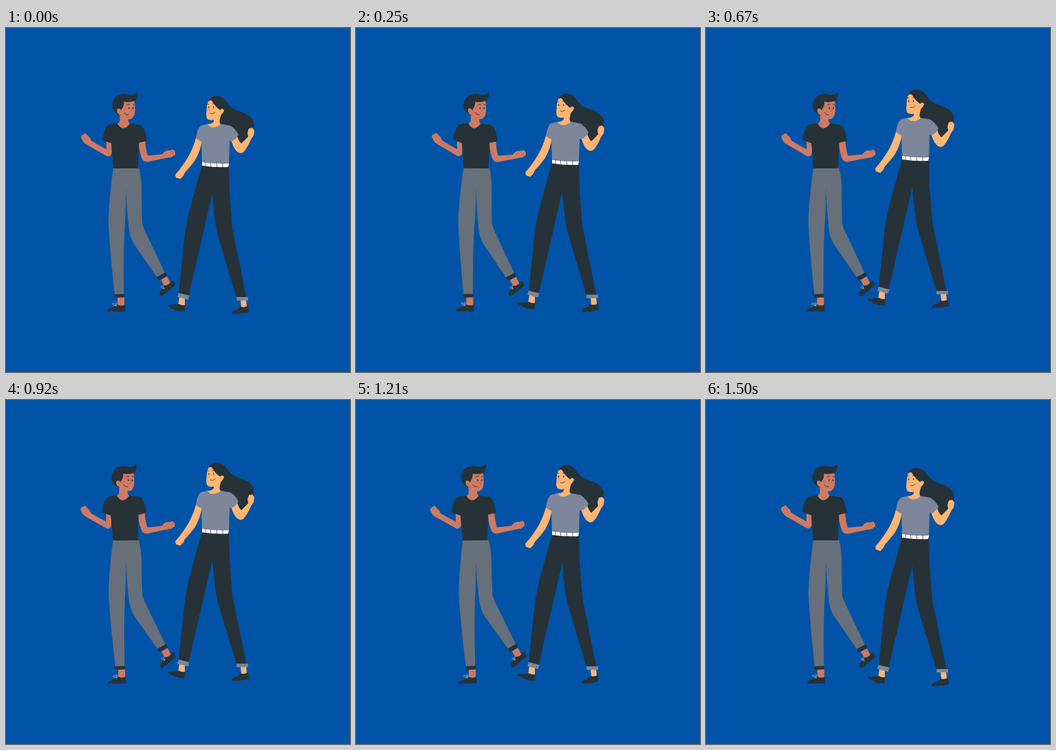
Write an HTML page with a canvas that moves like this. It is 500x500 px and loops after 1.54 s.

```html
<!DOCTYPE html>
<html lang="en">
<head>
<meta charset="utf-8">
<title>Dancing couple</title>
<style>
  html, body { margin: 0; width: 100%; height: 100%; overflow: hidden; background: #0053a6; }
  canvas { display: block; width: 100vw; height: 100vh; }
</style>
</head>
<body>
<canvas id="stage"></canvas>
<script>
const SIZE = 500;
const LOOP = 1540;
const CYCLE = 1500;
const STEP = CYCLE / 36;

const BLUE = '#0053a6';
const DARK = '#263238';
const GREY = '#676f7a';
const SLATE = '#7d869b';
const WHITE = '#ffffff';
const TAN = '#ce7a63';
const PEACH = '#ffb573';
const BLUSH = '#b3594a';
const LACE = '#8494a8';

const fill = (color, d) => ({ color, path: new Path2D(d) });
const line = (color, width, d) => ({ color, width, path: new Path2D(d) });

const man = [
  // arms
  fill(TAN, 'M146 163L153 165C154 174 154 181 153 184Q151 188 146 186L119 170.5Q114 168 112 165L109 159Q109 156 111 155.5L116 153L118 156L122 159.5L124 164L146 176.5Z'),
  fill(TAN, 'M193 164L202 163C203 172 204 180 206 185.5L227 183.5L230 180Q234 177 238 178L243 176.5L246 180L246 184L241 187.5L230 189.5L206 194.5Q199 195 197 188Q193 178 193 164Z'),
  line(BLUSH, .6, 'M238 180L241 183M241 178.5L243.5 181.5M112 157L114 160'),
  // feet
  fill(TAN, 'M162 391L172 391L172 404L162 404Z'),
  fill(TAN, 'M225 366L234 361L239 371L231 376Z'),
  fill(DARK, 'M147 412Q147 408 152 407Q158 405 162 402Q167 405 173 402L173 412Z'),
  fill(DARK, 'M225 389.5Q222 387 224 383Q228 379 229 374Q237 375 240 368L243 367L246 372Q246 375 242 377L231 386.5Q227 390 225 389.5Z'),
  line(LACE, 1, 'M160 404Q153 402 155 400Q157 399 160 404Q158 399 160 399Q162 400 160 404M230 379Q224 378 226 376Q228 375 230 379Q227 373 230 373.5'),
  // trousers
  fill(GREY, 'M156 203L193 203Q198 218 197 245L198 284Q199 289 202 295L231 356L220 363L186 314Q179 303 178 286Q175 258 174 231Q174.5 262 172.5 290Q170.5 330 171.5 388L158 388Q151 325 149 284Q149 253 156 203Z'),
  fill(DARK, 'M157 387L172 386.5L172 391.5L158 392Z'),
  fill(DARK, 'M219 362L232 355L234 360L222 367Z'),
  // shirt, neck
  fill(DARK, 'M163 138.5L179 138.5L195 141Q202 144 205 164L193 167L192 204L156 204L153 167.5Q146 166 140 162Q143 146 148 141Q154 139 163 138.5Z'),
  fill(TAN, 'M165 121L165.5 134Q165 138 162 139Q170 152.5 180 139Q177 138 177.5 130Z'),
  // head
  fill(TAN, 'M168 105L186 104Q188 112 187.5 120Q187 129 182 132Q175 134 168 129L162 124Z'),
  fill(DARK, 'M167 127Q159 125 156 119Q153 112 156 106Q159 98 167 96.5Q173 95 179 97Q187 98 190.5 93Q193 99 188.5 104Q190 106 187 106Q178 109 171.5 107Q172 114 168 118Z'),
  fill(TAN, 'M168 120Q164 115 161.5 118Q160 123 165 126L170 127Z'),
  fill(DARK, 'M178.8 115.3a.9 1.3 0 1 0 .1 0ZM184.6 115.3a.9 1.3 0 1 0 .1 0Z'),
  line(DARK, .9, 'M176 112Q178 110 180 111M184 111Q185 110 187 112M172 123Q174 127 178 126'),
  line(BLUSH, .8, 'M182 116Q185 121 181 121')
];

const woman = [
  // hair behind
  fill(DARK, 'M305 99C314 98.5 318 103 322 109Q327 117 339 121Q356 126 360 136Q361 142 359 150Q356 160 346 166Q341 170 337 162L326 145L309 141L308 112Z'),
  // left arm
  fill(PEACH, 'M276.5 158L285 162Q283 178 275 192Q267 203 260 210L258 214.5L253.5 219.5L247 217.5L246 213L252 206C266 188 272 175 276.5 158Z'),
  // feet
  fill(PEACH, 'M252 391L260 393L260 404L250 404Z'),
  fill(PEACH, 'M341 395L349 395L350 405L342 407Z'),
  fill(DARK, 'M235 404.5Q234.5 402 239 402Q246 403 251 401Q256 404 261 402.5L259.5 412L250 411.5Q241 408 235 404.5Z'),
  fill(DARK, 'M328 415.5Q328 411 335 410L341 405Q347 407 351.5 403.5L353 413Q342 416.5 328 415.5Z'),
  // trousers
  fill(DARK, 'M285 199L324 201L325 240L329 291L349.5 392L335 392L308 302Q303 283 300 240L265.5 389L251 386L260 299Q263 278 270 253Z'),
  fill(SLATE, 'M251 385L266.5 389L264.5 395L249 391Z'),
  fill(SLATE, 'M335 391L352 391L352 396L335 396Z'),
  // right arm
  fill(PEACH, 'M327 161L336 157Q338 164 342 168L352 158L351 152L353 146L358 145L361 149L360 156L356 162Q351 174 345 180.5Q340 184 335 179Q329 172 327 161Z'),
  // shirt, belt
  fill(SLATE, 'M293 139.5L312 139.5L326 142Q333 146 338 155Q335 161 328 165L325 164L324 198L285 196L284 165Q280 163.5 276 160Q278 146 283 142Z'),
  fill(WHITE, 'M285 195Q305 198 324 197L323 202Q303 203 285 200Z'),
  line(DARK, .7, 'M290 195L290 201M297 196L298 202M306 197L307 203M315 197L315 203'),
  // neck and head
  fill(PEACH, 'M302.5 127L302 136Q300 139 293 140Q300 149 312 140Q310 138 310.5 134L314 120Z'),
  fill(PEACH, 'M295 104Q291.5 111 291.5 121Q290 131 294 133Q304 136 311 128.5L317 120L308 105Z'),
  fill(DARK, 'M293 107.5Q297 99 306 98.5Q317 100 320 113L314 121Q305 116 299 105.5Q296 104.5 293 107.5Z'),
  fill(PEACH, 'M310 122Q312 116 316 118Q318.5 122 311 127Z'),
  fill(DARK, 'M294.4 114a.8 1.2 0 1 0 .1 0ZM301.6 114a.8 1.2 0 1 0 .1 0Z'),
  line(DARK, .8, 'M292 111Q294 109 295 111M300 110Q302 109 304 111M297 124Q301 126 304 122'),
  line('#e78b45', .8, 'M297 115Q293 121 297 121')
];

const canvas = document.getElementById('stage');
const ctx = canvas.getContext('2d');

function drawShapes(shapes) {
  for (const { color, width, path } of shapes) {
    if (width) {
      ctx.strokeStyle = color;
      ctx.lineWidth = width;
      ctx.stroke(path);
    } else {
      ctx.fillStyle = color;
      ctx.fill(path);
    }
  }
}

// Linear wave 0, 1, 0, -1, 0 over one cycle.
function sway(p) {
  if (p < .25) return p * 4;
  return p < .75 ? 2 - p * 4 : p * 4 - 4;
}

function drawMan(p) {
  ctx.save();
  ctx.translate(177.5, 252.5);
  ctx.rotate(sway(p) * Math.PI / 180);
  ctx.translate(-177.5, -252.5);
  drawShapes(man);
  ctx.restore();
}

function drawWoman(p) {
  ctx.save();
  ctx.translate(0, -10 * (1 - Math.abs(1 - 2 * p)));
  drawShapes(woman);
  ctx.restore();
}

function resize() {
  const ratio = window.devicePixelRatio || 1;
  canvas.width = Math.round(innerWidth * ratio);
  canvas.height = Math.round(innerHeight * ratio);
}

function render(now) {
  const step = Math.floor((now % LOOP + 3) / STEP);
  const phase = Math.min(1, step * STEP / CYCLE);
  ctx.setTransform(canvas.width / SIZE, 0, 0, canvas.height / SIZE, 0, 0);
  ctx.fillStyle = BLUE;
  ctx.fillRect(0, 0, SIZE, SIZE);
  ctx.lineCap = 'round';
  drawMan(phase);
  drawWoman(phase);
}

const start = performance.now();
function tick() {
  render(performance.now() - start);
  requestAnimationFrame(tick);
}

addEventListener('resize', resize);
resize();
tick();
</script>
</body>
</html>
```
